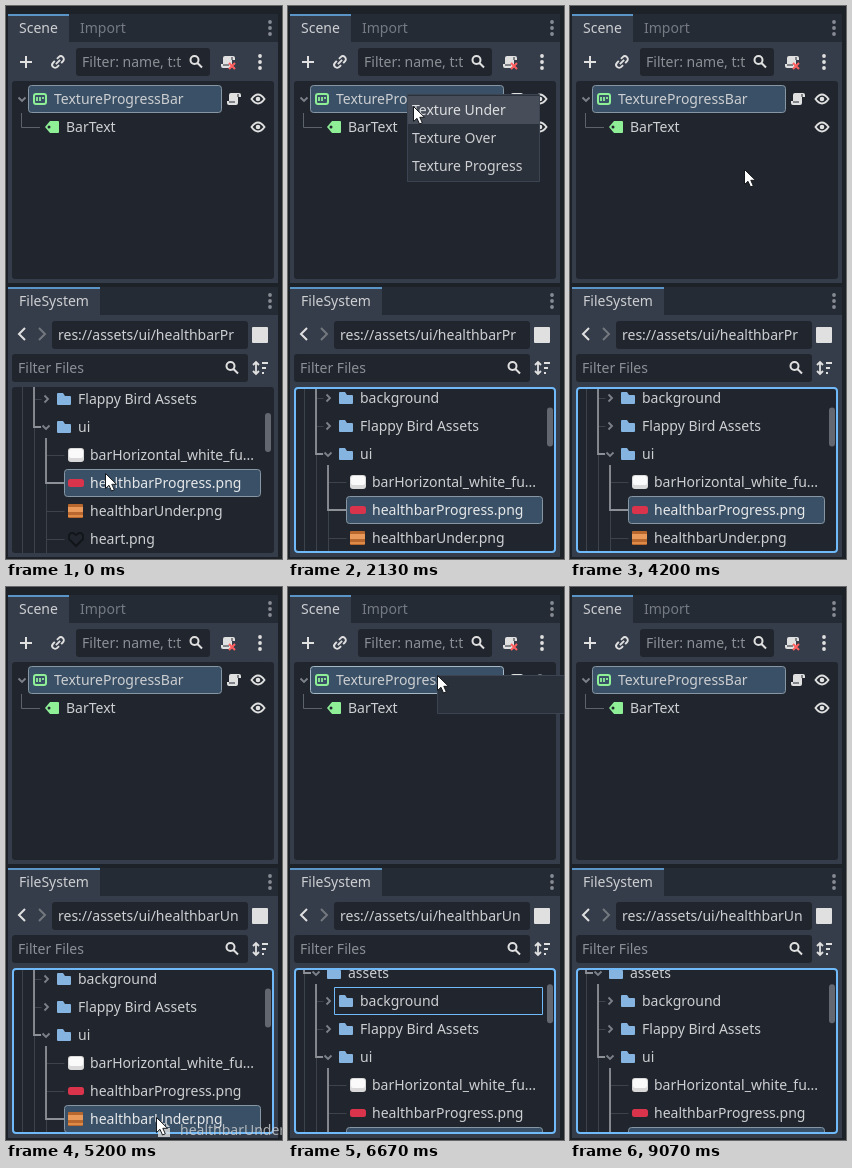
Write an HTML page with a canvas that moves like this. It is 276 px wide and 553 px high and loops after 9.8 s.

```html
<!DOCTYPE html>
<html lang="en">
<head>
<meta charset="utf-8">
<title>Assigning textures by drag and drop</title>
<style>
  html, body { margin: 0; width: 100%; height: 100%; overflow: hidden; background: #1d2229; }
  canvas { display: block; width: 276px; height: 553px; }
</style>
</head>
<body>
<canvas id="stage"></canvas>
<script>
const W = 276, H = 553, LOOP = 9800, STEP = 200 / 3;
const canvas = document.getElementById('stage');
const ctx = canvas.getContext('2d');
const dpr = window.devicePixelRatio || 1;
canvas.width = W * dpr;
canvas.height = H * dpr;

const BACK = '#1d2229', STRIP = '#252b34', PANEL = '#363d4a', FIELD = '#21262e';
const TEXT = '#cdcfd2', DIM = '#8b8f96', ICON = '#e0e0e0', ACCENT = '#70bafa';
const SELECTED = '#3a5066', EDGE = '#8796a3', GREEN = '#8eef97';
const FAINT = '#3d434b', LINE = '#5d636b', BRIGHT = '#8d9197';

// Pointer path: time, x, y
const POINTER = [
  [0, 99, 467], [200, 97, 473], [333, 97, 473], [467, 100, 455], [667, 110, 330], [867, 118, 150],
  [1067, 120, 88], [2067, 120, 88], [2133, 125, 100], [2333, 150, 124], [2600, 160, 112],
  [2733, 160, 112], [3333, 170, 142], [3533, 170, 142], [3867, 174, 163], [4200, 174, 163],
  [4400, 172, 190], [4800, 155, 430], [5133, 150, 530], [5200, 150, 530], [5333, 152, 505],
  [5533, 158, 260], [5667, 160, 140], [5733, 161, 118], [5867, 157, 96], [6133, 153, 86],
  [6467, 149, 88], [6933, 149, 88], [7267, 180, 125], [7600, 184, 103], [7933, 184, 103],
  [8267, 284, 104], [8467, 284, 106], [8800, 120, 300], [9000, 45, 500], [9060, 46, 560], [9800, 46, 560]
];
const SCROLL = [[0, 0], [533, 0], [667, 27], [5367, 27], [5500, 49], [9800, 49]];

const FILES = [
  { name: 'assets', depth: 0, open: true },
  { name: 'background', depth: 1 },
  { name: 'Flappy Bird Assets', depth: 1 },
  { name: 'ui', depth: 1, open: true },
  { name: 'barHorizontal_white_fu...', depth: 2, icon: whiteBar },
  { name: 'healthbarProgress.png', depth: 2, icon: redBar },
  { name: 'healthbarUnder.png', depth: 2, icon: orangeBar },
  { name: 'heart.png', depth: 2, icon: heart }
];

function sample(keys, t) {
  const i = Math.max(1, keys.findIndex(k => k[0] >= t));
  const a = keys[i - 1], b = keys[i];
  const u = Math.min(1, Math.max(0, (t - a[0]) / (b[0] - a[0])));
  return a.slice(1).map((v, j) => v + (b[j + 1] - v) * u);
}

function box(x, y, w, h, fill, radius = 0, edge, width = 1) {
  ctx.beginPath();
  ctx.roundRect(x, y, w, h, radius);
  if (fill) { ctx.fillStyle = fill; ctx.fill(); }
  if (edge) { ctx.strokeStyle = edge; ctx.lineWidth = width; ctx.stroke(); }
}

function label(text, x, centre, color = TEXT) {
  ctx.fillStyle = color;
  ctx.fillText(text, x, centre + 5);
}

// Draws SVG path data around a centre point
function shape(x, y, d, { fill, stroke, width = 2 } = {}) {
  ctx.save();
  ctx.translate(x, y);
  const path = new Path2D(d);
  if (fill) { ctx.fillStyle = fill; ctx.fill(path); }
  if (stroke) { ctx.strokeStyle = stroke; ctx.lineWidth = width; ctx.stroke(path); }
  ctx.restore();
}

function dot(x, y, r, color) {
  ctx.beginPath();
  ctx.arc(x, y, r, 0, 7);
  ctx.fillStyle = color;
  ctx.fill();
}

function menuDots(x, y, color) {
  for (const dy of [-6, 0, 6]) dot(x, y + dy, 1.9, color);
}

function magnifier(x, y) {
  shape(x, y, 'M2.5-2A4 4 0 1 1-5.5-2A4 4 0 1 1 2.5-2M1.5 1L6 5.5', { stroke: ICON });
}

function chevron(x, y, open) {
  shape(x, y, open ? 'M-3.5-1.5L0 2L3.5-1.5' : 'M-1.5-3.5L2 0L-1.5 3.5', { stroke: '#7d828a', width: 1.8 });
}

function eye(y) {
  shape(252, y, 'M-6.5 0Q0-9 6.5 0Q0 9-6.5 0Z', { stroke: ICON, width: 1.9 });
  dot(252, y, 2.3, ICON);
}

function scriptIcon(x, y) {
  shape(x, y, 'M-3-6H5Q7-6 7-4V-2H4V4Q4 6 2 6H-5Q-7 6-7 4V2H-5V-4Q-5-6-3-6Z', { fill: ICON });
  shape(x, y, 'M4-5V-2M-5 3H1', { stroke: FIELD, width: 1 });
}

function folder(x, y) {
  shape(x, y, 'M-7-5Q-7-6-6-6H-1L1-3H6Q7-3 7-2V5Q7 6 6 6H-6Q-7 6-7 5Z', { fill: '#85b4e0' });
}

function whiteBar(x, y) {
  box(x - 8, y - 7, 16, 14, '#d9d9d9', 3);
  box(x - 7, y - 6, 14, 9, '#fafafa', 2);
}

function redBar(x, y) {
  box(x - 8, y - 4, 16, 8, '#d9344c', 2.5);
}

function orangeBar(x, y) {
  box(x - 8, y - 7, 15, 14, '#b8682f', 1);
  box(x - 8, y - 4, 15, 5, '#e99a5b');
  box(x - 8, y + 4, 15, 2, '#e08a48');
}

function heart(x, y) {
  shape(x, y, 'M0-4L-3-6H-5L-7-4V0L0 7L7 0V-4L5-6H3Z', { stroke: '#12151a', width: 2 });
}

function fileIcon(x, y) {
  shape(x, y, 'M-6-7H1V-2H6V7H-6ZM2-7L6-3H2Z', { fill: ICON });
}

function dock(top, bottom, title, tabWidth) {
  box(2, top, 270, 28, STRIP);
  box(2, top + 28, 270, bottom - top - 28, PANEL);
  box(2, top, tabWidth, 28, PANEL);
  box(2, top, tabWidth, 2, '#5b94c6');
  label(title, 13, top + 14);
  menuDots(264, top + 14, '#878c94');
}

function scenePanel(dropRow) {
  dock(8, 277, 'Scene', 61);
  label('Import', 74, 22, '#757a83');

  shape(20, 56, 'M-6 0H6M0-6V6', { stroke: ICON });
  ctx.save();
  ctx.translate(52, 56);
  ctx.rotate(-Math.PI / 4);
  shape(0, 0, 'M-1.5-3H-4A3 3 0 0 0-4 3H-1.5M1.5-3H4A3 3 0 0 1 4 3H1.5M-3 0H3', { stroke: ICON, width: 1.9 });
  ctx.restore();
  box(70, 42, 134, 28, FIELD, 3);
  label('Filter: name, t:t', 76, 56, DIM);
  magnifier(190, 56);
  scriptIcon(222, 56);
  shape(226, 60, 'M-3-3L3 3M3-3L-3 3', { stroke: '#ff5f5f' });
  menuDots(254, 56, ICON);

  box(6, 75, 262, 198, FIELD, 3);
  shape(0, 0, 'M15.5 107V121.5H34', { stroke: LINE, width: 1 });
  box(22.5, 79.5, 193, 27, SELECTED, 3, dropRow === 0 ? '#a7b9c7' : EDGE);
  chevron(16, 93, true);
  box(28, 88, 12, 10, null, 2, GREEN, 2);
  shape(34, 93, 'M-3-2V2M0-2V2M3-2V0', { stroke: GREEN, width: 1.8 });
  label('TextureProgressBar', 48, 93);
  scriptIcon(228, 93);
  eye(93);

  if (dropRow === 1) box(34.5, 107.5, 205, 28, null, 0, ACCENT);
  shape(46, 121, 'M-7 0L-2-6H6Q7-6 7-5V5Q7 6 6 6H-2Z', { fill: GREEN });
  dot(43, 121, 1.5, FIELD);
  label('BarText', 60, 121);
  eye(121);
}

function fileTree(scroll, selected, staleDrop) {
  const rowY = i => Math.round(337 + 28 * i + scroll);
  ctx.save();
  ctx.beginPath();
  ctx.rect(6, 381, 262, 166);
  ctx.clip();

  // Guide lines: faint for siblings, bright along the way to the selection
  shape(0, 0, `M16.5 381V547M28.5 ${rowY(0) + 14}V547M40.5 ${rowY(3) + 14}V547`, { stroke: FAINT, width: 1 });
  FILES.forEach((f, i) => {
    if (f.depth) shape(0, 0, `M${16.5 + 12 * f.depth} ${rowY(i) + .5}h${f.depth === 2 ? 18 : 7}`, { stroke: FAINT, width: 1 });
  });
  shape(0, 0, `M16 381V${rowY(0)}H23M28 ${rowY(0) + 11}V${rowY(3)}H35M40 ${rowY(3) + 11}V${rowY(selected)}H58`, { stroke: BRIGHT, width: 1.8 });

  FILES.forEach((f, i) => {
    const y = rowY(i), x = 46 + 12 * f.depth;
    if (i === selected) box(58.5, y - 13.5, 196, 27, SELECTED, 3, EDGE);
    if (f.icon) f.icon(x, y);
    else {
      chevron(x - 18, y, f.open);
      folder(x, y);
    }
    label(f.name, x + 14, y, i === selected ? '#e6e8ea' : TEXT);
  });

  if (staleDrop === 'line') box(46, rowY(2) + 14, 206, 1, ACCENT);
  if (staleDrop === 'box') box(46.5, rowY(1) - 13.5, 208, 27, null, 0, ACCENT);
  box(259, 407 - scroll * .2, 6, 39, '#636870', 3);
  ctx.restore();
}

function filePanel(state) {
  dock(281, 551, 'FileSystem', 92);
  shape(16, 328, 'M3-6L-3 0L3 6', { stroke: ICON });
  shape(36, 328, 'M-3-6L3 0L-3 6', { stroke: '#73787f' });
  box(46, 315, 196, 28, FIELD, 3);
  label('res://assets/ui/healthbar' + (state.selected === 5 ? 'Pr' : 'Un'), 52, 328.5);
  box(246, 321, 16, 16, ICON, 1);
  box(6, 348, 236, 28, FIELD, 3);
  label('Filter Files', 12, 362, DIM);
  magnifier(226, 362);
  shape(250, 362, 'M0-5V5M-3-3L0-6L3-3M-3 3L0 6L3 3', { stroke: ICON, width: 1.8 });
  shape(256, 362, 'M0-5H6M0 0H4M0 5H2', { stroke: ICON });

  box(6, 381, 262, 166, FIELD, 3);
  fileTree(state.scroll, state.selected, state.staleDrop);
  if (state.focused) box(7, 382, 260, 164, null, 3, ACCENT, 2);
}

function popup(x, full, hover) {
  box(x + .5, 88.5, 132, full ? 87 : 38, '#2b313a', 0, '#3d4451');
  if (!full) return;
  if (hover >= 0) box(x + 1, 90 + 28 * hover, 131, 28, '#484e59');
  ['Texture Under', 'Texture Over', 'Texture Progress'].forEach((s, i) =>
    label(s, x + 5, 104 + 28 * i, i === hover ? '#dcdee0' : TEXT));
}

function pointer(x, y) {
  shape(x, y, 'M.5.5V15.5L4 12.3L6.5 18L9.3 16.8L6.8 11.3H11.5Z', { fill: '#fff', stroke: '#15181c', width: 1 });
}

function draw(t) {
  const during = (a, b) => t >= a - 5 && t < b - 5;
  const [x, y] = sample(POINTER, t);
  const first = during(400, 1870), second = during(5200, 6730);
  const dragging = first || second;
  const outside = y < 381;
  const dropRow = dragging && y >= 79 && y < 135 ? (y < 107 ? 0 : 1) : -1;

  ctx.setTransform(dpr, 0, 0, dpr, 0, 0);
  ctx.font = '14px "Noto Sans", sans-serif';
  box(0, 0, W, H, BACK);
  scenePanel(dropRow);
  filePanel({
    scroll: sample(SCROLL, t)[0],
    selected: t < 5195 ? 5 : 6,
    focused: t >= 395,
    staleDrop: outside && (first ? 'line' : second ? 'box' : null)
  });

  if (dragging) {
    const [lx, ly] = sample(POINTER, t - 15);
    ctx.globalAlpha = .8;
    fileIcon(lx + 8, ly + 13);
    label(first ? 'healthbarProgress.png' : 'healthbarUnder.png', lx + 24, ly + 13);
    ctx.globalAlpha = 1;
  }

  const hover = Math.floor((y - 90) / 28);
  if (during(1730, 4200)) popup(119, t >= 1865, t >= 2128 ? hover : -1);
  if (during(6670, 7800)) popup(149, t >= 6725, t >= 6995 ? hover : -1);
  pointer(Math.round(x), Math.round(y));
}

function tick() {
  const t = performance.now() % LOOP;
  draw(Math.floor(t / STEP + .06) * STEP % LOOP);
  requestAnimationFrame(tick);
}
tick();
</script>
</body>
</html>
```
